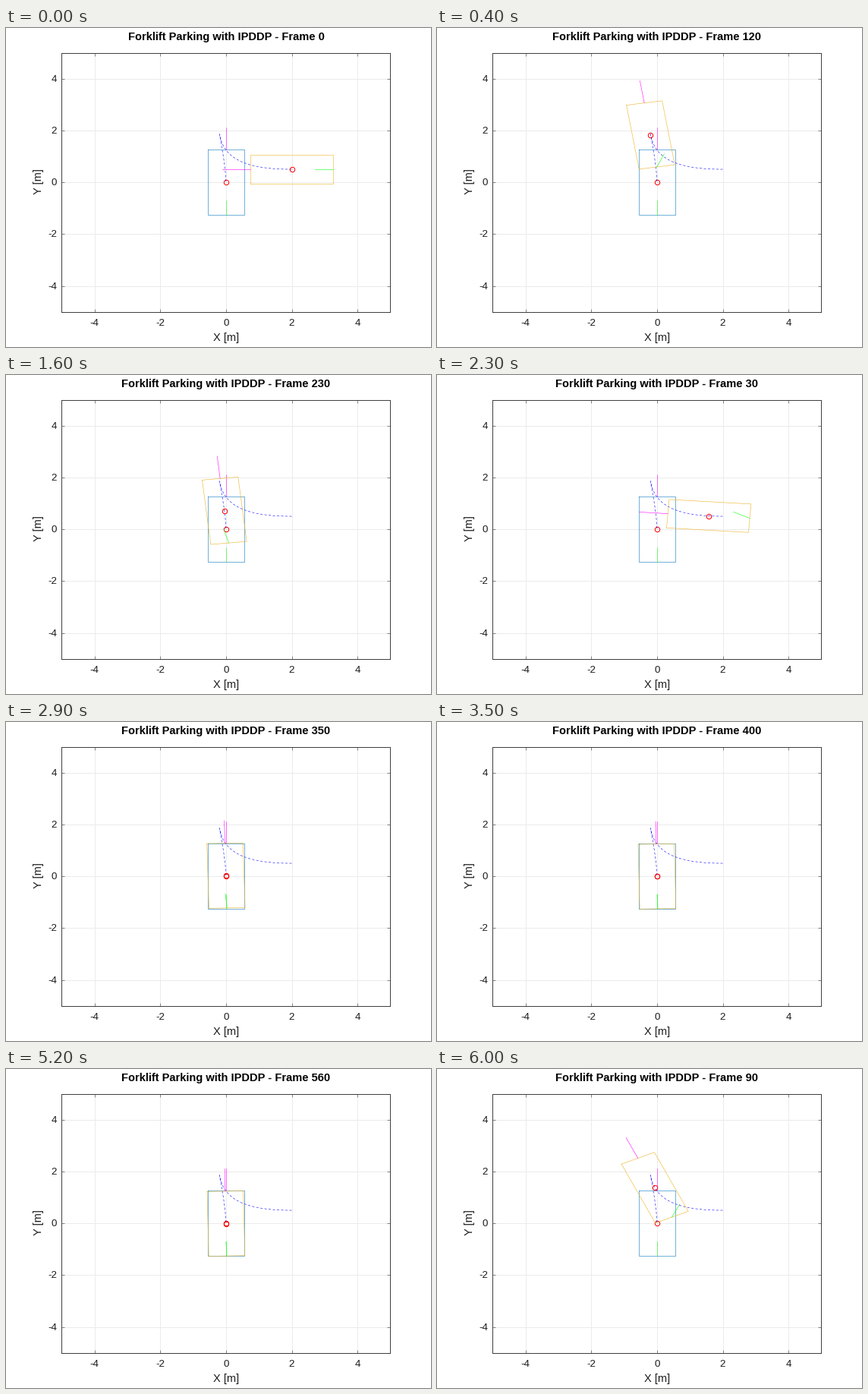
A matplotlib script that plays this animation: 560x420 px, repeating every 6100 ms.

```python
import numpy as np
import matplotlib.pyplot as plt
from matplotlib.animation import FuncAnimation

W, H, DPI = 560, 420, 100
PX = 72 / DPI                       # points per pixel
LEFT, RIGHT, TOP, BOTTOM = 73.4, 506.4, 32.6, 373.6
THIN = 0.55 * PX
INK = "#1c1c1c"
FRAME = "#3f3f3f"

LENGTH, WIDTH, FORK, WHEEL = 2.5, 1.1, 0.87, 0.55
START, CUSP, END = (2.0, 0.5), (-0.2, 1.86), (0.0, -0.012)
SWITCH, PEAK = 130, 69              # steps: reversal point, top speed


def heading(deg):
    a = np.radians(deg)
    return np.array([np.cos(a), np.sin(a)])


def bezier(p0, dir0, p3, dir3):
    """Cubic from its ends and the offsets to its inner control points."""
    p0, p3 = np.array(p0), np.array(p3)
    p1, p2 = p0 + dir0, p3 + dir3

    def point(u):
        v = 1 - u
        return v**3 * p0 + 3 * v * v * u * p1 + 3 * v * u * u * p2 + u**3 * p3

    def tangent(u):
        v = 1 - u
        return v * v * (p1 - p0) + 2 * v * u * (p2 - p1) + u * u * (p3 - p2)

    return point, tangent


APPROACH = bezier(START, 1.5 * heading(180), CUSP, -0.9 * heading(98))
REVERSE = bezier(CUSP, -0.62 * heading(98), END, 0.62 * heading(91.1))


def state(step):
    """Position, heading and steering angle (degrees) at a step."""
    if step < SWITCH:
        # speed rises evenly to its peak, then falls evenly to a stop
        if step < PEAK:
            u = step**2 / (PEAK * SWITCH)
        else:
            u = 1 - (SWITCH - step)**2 / (SWITCH * (SWITCH - PEAK))
        point, tangent = APPROACH
        dx, dy = tangent(u)
    else:
        u = 1 - np.exp(-((step - SWITCH) / 103)**1.8)
        point, tangent = REVERSE
        dx, dy = -tangent(u)
    steer = np.interp(step, (0, 30, 90, 170, 230, 400),
                      (0, -22, -50, -4, 10, 1.5))
    return point(u), np.degrees(np.arctan2(dy, dx)), steer


def label(x, y, text, size=14.67, ha="center", va="baseline", **kw):
    return fig.text(x / W, 1 - y / H, text, fontsize=size * PX,
                    ha=ha, va=va, **kw)


class Forklift:
    def __init__(self, color, z):
        def line(c):
            return ax.plot([], [], color=c, lw=THIN, zorder=z)[0]
        self.body, self.fork, self.wheel = map(line, (color, "magenta", "lime"))
        self.centre, = ax.plot([], [], "o", mfc="none", mec="red",
                               ms=6.4 * PX, mew=PX, zorder=z + 0.5)

    def place(self, mid, theta, steer):
        ahead, side = heading(theta), heading(theta + 90)
        front, rear = mid + ahead * LENGTH / 2, mid - ahead * LENGTH / 2
        half = side * WIDTH / 2
        corners = [front + half, front - half, rear - half, rear + half,
                   front + half]
        tip = rear + heading(theta + steer) * WHEEL
        self.body.set_data(*np.transpose(corners))
        self.fork.set_data(*np.transpose([front, front + ahead * FORK]))
        self.wheel.set_data(*np.transpose([rear, tip]))
        self.centre.set_data(*mid[:, None])


plt.rcParams["font.family"] = "Liberation Sans"
fig = plt.figure(figsize=(W / DPI, H / DPI), dpi=DPI, facecolor="white")
ax = fig.add_axes([LEFT / W, 1 - BOTTOM / H,
                   (RIGHT - LEFT) / W, (BOTTOM - TOP) / H])
ax.set(xlim=(-5, 5), ylim=(-5, 5))
ax.set_axisbelow(True)
ticks = range(-4, 5, 2)
ax.set_xticks(ticks)
ax.set_yticks(ticks)
ax.grid(color="#ebebeb", lw=PX)
ax.tick_params(direction="in", length=4 * PX, width=0.6 * PX, color=FRAME,
               top=True, right=True, labelbottom=False, labelleft=False)
for spine in ax.spines.values():
    spine.set(color=FRAME, linewidth=PX)

for t in ticks:
    label(289.8 + 43.3 * t, 392, str(t), 13.33, color=INK)
    label(66.8, 202.7 - 34.1 * t, str(t), 13.33, ha="right",
          va="center_baseline", color=INK)
label(290, 412, "X [m]", color=INK)
label(42.5, 202.5, "Y [m]", va="center", rotation=90, color=INK)
title = label(290, 16, "", weight="bold", color="black")

goal = Forklift("#0072bd", 3)
goal.place(np.zeros(2), 90, 0)
route = np.array([state(s)[0] for s in range(601)])
ax.plot(*route.T, color="blue", lw=THIN, dashes=(5.5, 4.5), zorder=4)
truck = Forklift("#edb120", 5)

# The steps play in the order of their names sorted as text.
STEPS = sorted(range(0, 601, 10), key=str)


def draw(step):
    truck.place(*state(step))
    title.set_text(f"Forklift Parking with IPDDP - Frame {step}")
    return []


anim = FuncAnimation(fig, draw, frames=STEPS, interval=100, repeat=True,
                     repeat_delay=0, init_func=lambda: draw(STEPS[0]))
plt.show()
```
